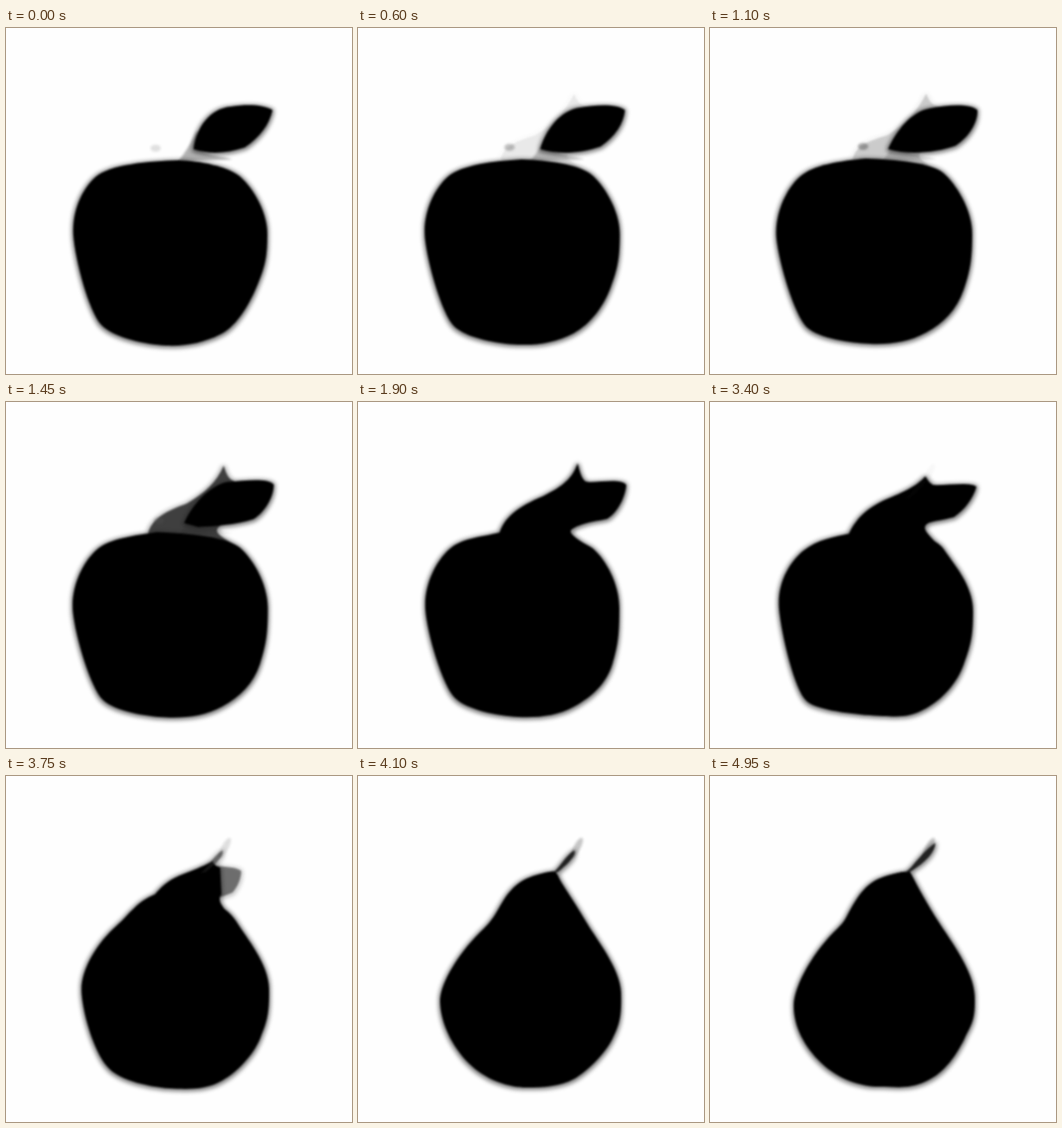
Recreate the animation shown at these times as an HTML page without scripts. Size 400 by 400 pixels, loop 5 s.

```html
<!DOCTYPE html>
<html lang="en">
<head>
<meta charset="utf-8">
<title>Apple to pear</title>
<style>
html, body { margin: 0; width: 100%; height: 100%; overflow: hidden; background: #fefefe; }
svg { display: block; width: 100%; height: 100%; }
path, ellipse { animation: 5s linear infinite; }
#body { animation-name: body; }
#neck { animation-name: neck, neck-fade; }
#leaf { animation-name: leaf, leaf-fade; }
#stem { animation-name: stem, stem-fade; }
#tip { animation-name: stem-fade; }
#stalk { animation-name: stalk-fade; }
#crumb { animation-name: crumb; }

@keyframes body {
  0% { d: path("M200 153C225 154 254 160 268 170S302 210 302 238S299 276 291 296S268 344 248 354S208 368 185 367S124 358 110 343S80 268 78 240S88 186 104 172S165 154 200 153Z"); }
  22% { d: path("M180 151C215 152 256 156 270 168S303 210 303 238S301 280 293 303S270 341 250 352S208 366 185 365S126 359 112 346S80 272 77 244S88 186 104 172S150 154 180 151Z"); }
  38% { d: path("M167 150C215 152 258 158 272 170S302 210 302 238S301 280 294 303S270 341 250 352S208 365 185 364S126 356 112 342S80 268 78 240S90 184 106 170S148 156 167 150Z"); }
  51% { d: path("M163 152C215 152 258 156 272 170S302 210 302 238S301 280 294 303S270 341 250 352S208 365 190 364S126 356 112 342S81 268 79 240S91 184 107 171S146 155 163 152Z"); }
  68% { d: path("M162 152C210 148 258 152 270 170S304 212 304 242S301 282 293 304S268 344 250 354S222 364 200 363S126 358 112 346S83 270 80 240S92 185 108 172S144 156 162 152Z"); }
  82% { d: path("M228 110C235 125 250 145 262 166S303 222 304 250S302 288 294 304S266 341 250 350S215 360 195 360S148 352 128 332S96 285 95 262S120 200 146 176S165 118 228 110Z"); }
  100% { d: path("M231 110C240 128 252 150 265 170S305 226 306 254S303 286 294 304S272 343 250 353S215 359 195 359S149 351 129 332S97 290 97 266S122 200 148 176S165 118 231 110Z"); }
}

@keyframes neck {
  0%, 22% { d: path("M165 152C168 136 185 130 205 124C225 112 240 96 250 76C254 88 260 90 266 92L250 138C235 148 240 152 270 168L220 200Z"); }
  38% { d: path("M163 154C168 134 185 121 214 109C238 97 248 88 254 71C258 90 262 93 268 93L262 139C240 148 238 150 272 170L220 200Z"); }
  51% { d: path("M161 155C168 134 185 123 212 110C238 98 246 88 253 76C257 91 262 95 268 95L262 139C240 148 238 150 272 170L220 200Z"); }
  68% { d: path("M159 156C168 136 180 122 210 110C232 101 242 94 249 86C254 95 258 97 264 97L258 137C242 144 246 148 270 171L220 200Z"); }
  82%, 100% { d: path("M150 178C165 150 175 125 200 117C215 112 222 111 228 111C229 112 230 113 231 115L240 136C246 145 250 150 260 167L220 200Z"); }
}
@keyframes neck-fade {
  0% { opacity: 0; }
  8% { opacity: .03; }
  22% { opacity: .14; }
  34%, 100% { opacity: 1; }
}

@keyframes leaf {
  0% { d: path("M217 140C220 115 236 93 260 91C280 88 298 89 308 95C304 112 294 126 276 138C255 145 235 146 217 140Z"); }
  22% { d: path("M206 140C215 120 232 97 254 93C278 88 302 88 309 95C310 108 300 126 284 136C262 144 230 147 206 140Z"); }
  38% { d: path("M206 140C215 120 236 98 258 92C275 95 303 87 310 96C309 110 300 128 288 135C270 139 255 140 243 150Z"); }
  51% { d: path("M206 140C215 120 236 100 258 94C275 95 303 90 311 99C307 115 296 132 286 136C268 139 252 141 243 149Z"); }
  68% { d: path("M215 135C230 115 240 102 256 96C275 97 300 92 308 98C304 112 295 124 282 133C265 138 255 137 246 143Z"); }
  82%, 100% { d: path("M215 130C220 122 224 116 229 112C232 114 234 118 236 122C239 128 240 132 242 136C240 140 238 142 236 144Z"); }
}
@keyframes leaf-fade {
  0%, 69% { opacity: 1; }
  80%, 100% { opacity: 0; }
}

@keyframes stem {
  0%, 82% { d: path("M225 112C233 107 238 94 250 86C253 92 241 103 231 111Z"); }
  100% { d: path("M225 112C235 106 243 90 261 77C260 91 244 103 231 111Z"); }
}
@keyframes stem-fade {
  0%, 66% { opacity: 0; }
  82%, 100% { opacity: 1; }
}
@keyframes stalk-fade {
  0% { opacity: .3; }
  22% { opacity: .15; }
  36%, 100% { opacity: 0; }
}
@keyframes crumb {
  0% { opacity: .18; transform: translate(173px, 139px); }
  22% { opacity: .5; transform: translate(177px, 137px); }
  36%, 100% { opacity: 0; transform: translate(177px, 137px); }
}
</style>
</head>
<body>
<svg viewBox="0 0 400 400">
  <defs>
    <filter id="ink" filterUnits="userSpaceOnUse" x="0" y="0" width="400" height="400" color-interpolation-filters="sRGB">
      <feMorphology in="SourceGraphic" operator="dilate" radius="2"/>
      <feGaussianBlur stdDeviation="2.6"/>
      <feOffset dx="-.5" dy="1"/>
      <feComponentTransfer result="halo"><feFuncA type="linear" slope=".5"/></feComponentTransfer>
      <feGaussianBlur in="SourceGraphic" stdDeviation=".9" result="core"/>
      <feMerge><feMergeNode in="halo"/><feMergeNode in="core"/></feMerge>
    </filter>
    <filter id="soft" x="-50%" y="-50%" width="200%" height="200%">
      <feGaussianBlur stdDeviation="1.8"/>
    </filter>
  </defs>
  <path id="stalk" filter="url(#soft)" d="M199 154C209 142 214 132 221 118L226 142C236 148 250 148 262 152Z"/>
  <g id="tip-tone" opacity=".22" filter="url(#soft)">
    <ellipse id="tip" cx="253" cy="83" rx="4" ry="13" transform="rotate(28 253 83)"/>
  </g>
  <g filter="url(#ink)">
    <path id="body"/>
    <path id="neck"/>
    <path id="leaf"/>
    <path id="stem" fill="#222"/>
  </g>
  <ellipse id="crumb" rx="6" ry="4" fill="#555" filter="url(#soft)"/>
</svg>
</body>
</html>
```
